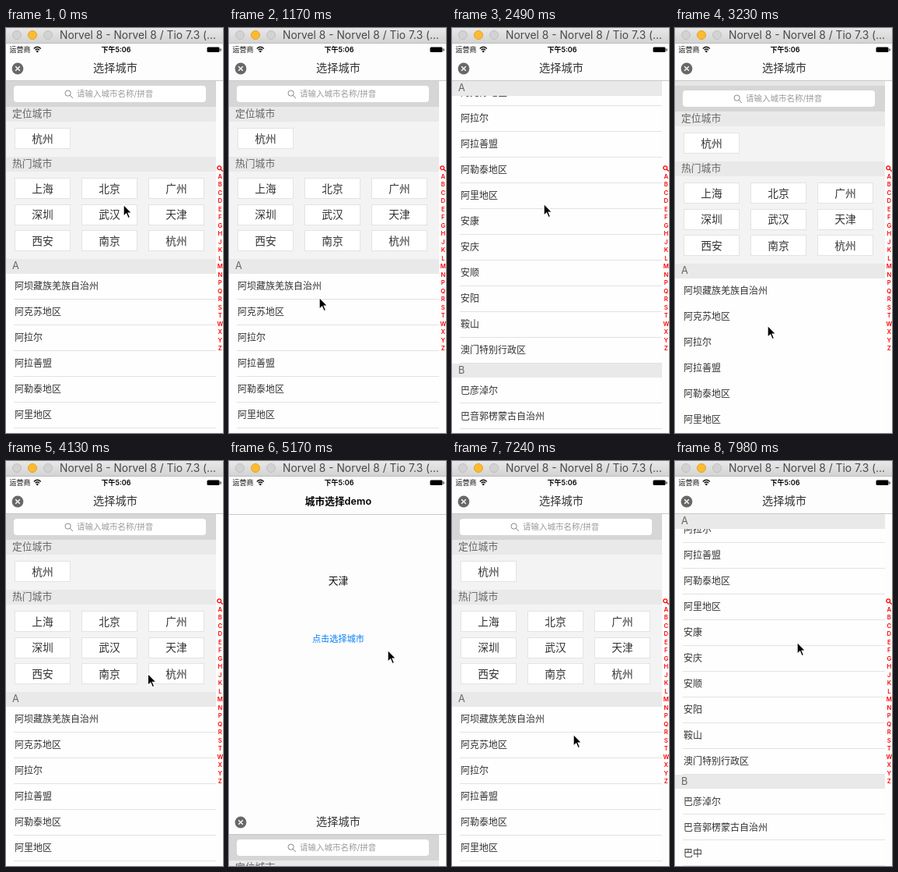
Write an HTML page that moves like this. It is 279x519 px and loops after 8 s.

```html
<!DOCTYPE html>
<html lang="zh-CN">
<head>
<meta charset="utf-8">
<title>选择城市</title>
<style>
html, body { margin: 0; width: 100%; height: 100%; overflow: hidden; background: #fdfdfd; }
body { position: relative; font-family: Inter, "Noto Sans CJK SC", "Noto Sans CJK", sans-serif; }
div, svg { position: absolute; box-sizing: border-box; }
.t { line-height: 20px; height: 20px; white-space: pre; }
#stage { left: 0; top: 0; width: 279px; height: 519px; overflow: hidden; background: #fdfdfd; }
#modal { left: 0; top: 20px; width: 279px; height: 499px; background: #fdfdfd; }
#view { left: 0; top: 48px; width: 270px; height: 451px; overflow: hidden; background: #e6e6e6; }
#list { left: 0; top: 0; width: 270px; height: 900px; background: #fefefe; }
.head { left: 0; width: 270px; height: 18.5px; background: #e9e9e9; }
.cell { left: 0; width: 270px; background: #f3f3f3; }
.city { width: 72px; height: 27px; background: #fff; border: 1px solid #e3e3e3; }
.line { left: 10px; width: 260px; height: 1px; background: #e2e2e2; }
.rule { left: 0; width: 279px; height: 1px; background: #c8c8c8; }
#bar { left: 0; top: 0; width: 279px; height: 20px; background: linear-gradient(#e8e8e8, #d3d3d3); border-bottom: 1px solid #bdbdbd; }
.dot { top: 2.5px; width: 12px; height: 12px; border-radius: 50%; background: #d2d2d2; border: 1px solid #c0c0c0; }
</style>
</head>
<body>
<div id="stage">
  <div id="home"><div class="rule" style="top:68px"></div></div>
  <div id="modal">
    <div id="view"><div id="list">
      <div style="left:0;top:0;width:270px;height:33px;background:#d6d6d6"></div>
      <div style="left:9.5px;top:6px;width:247px;height:21px;border-radius:4px;background:#fff"></div>
      <svg style="left:75px;top:11px" width="12" height="12" fill="none" stroke="#888"><circle cx="4.6" cy="4.6" r="3.6"/><path d="M7.3 7.3L11 11"/></svg>
    </div></div>
    <div class="rule" style="top:47px"></div>
    <svg style="left:7px;top:24px" width="16" height="16"><circle cx="8" cy="8" r="7.4" fill="#686868"/><path d="M5.2 5.2L10.8 10.8M10.8 5.2L5.2 10.8" stroke="#fff" stroke-width="1.4"/></svg>
    <svg style="left:271px;top:156px" width="8" height="8" fill="none" stroke="#f00" stroke-width="1.3"><circle cx="3.2" cy="3.2" r="2.4"/><path d="M5 5L7.6 7.6"/></svg>
  </div>
  <div id="status">
    <svg style="left:35px;top:23px" width="11" height="9" fill="none" stroke="#111" stroke-width="1.4"><path d="M.8 3.4Q5.3 -.8 9.8 3.4M2.6 5.2Q5.3 2.9 8 5.2"/><circle cx="5.3" cy="7" r=".6"/></svg>
    <svg style="left:258px;top:24px" width="20" height="8"><rect x=".5" y=".5" width="16" height="6.5" rx="1.5" fill="#000"/><path d="M18 2.5v3" stroke="#222" stroke-width="1.2"/></svg>
  </div>
  <div id="bar">
    <div class="dot" style="left:8px"></div>
    <div class="dot" style="left:28px;background:#fcbb30;border-color:#e3a32a"></div>
    <div class="dot" style="left:48px"></div>
  </div>
  <svg id="cursor" style="left:-1px;top:-1px" width="15" height="22"><path d="M1 1V16.5L4.6 13.2L7 18.8L9.7 17.6L7.3 12.2H12Z" fill="#000" stroke="#fff" stroke-width="1.4"/></svg>
</div>
<script>
const $ = id => document.getElementById(id);

function box(parent, cls, css) {
  const el = document.createElement('div');
  el.className = cls;
  for (const key in css) el.style[key] = typeof css[key] === 'number' ? css[key] + 'px' : css[key];
  return parent.appendChild(el);
}

function text(parent, str, x, midY, size, color, center, weight = '400') {
  const css = { left: x, top: midY - 10, fontSize: size, color, fontWeight: weight };
  if (center) Object.assign(css, { left: x - 100, width: 200, textAlign: 'center' });
  const el = box(parent, 't', css);
  el.textContent = str;
  return el;
}

// Fixed labels
text($('bar'), 'Norvel 8 - Norvel 8 / Tio 7.3 (…', 69, 9, 13.8, '#4a4a4a');
text($('status'), '运营商', 4.5, 28, 9, '#111');
text($('status'), '下午5:06', 141.5, 28, 9, '#000', true, '600');
text($('home'), '城市选择demo', 140.5, 52, 12.7, '#000', true, '600');
text($('home'), '天津', 140.5, 154, 12.8, '#111', true);
const button = text($('home'), '点击选择城市', 140.5, 228, 11.2, '#0a80fa', true);
text($('modal'), '选择城市', 140.5, 31, 14.2, '#333', true);
[...'ABCDEFGHJKLMNPQRSTWXYZ'].forEach((c, i) =>
  text($('modal'), c, 275.3, 170.5 + 10.5 * i, 7.6, '#f00', true, '600'));

// City list
const list = $('list'), HEAD = 18.5, ROW = 33;
const heads = [], lines = [];
text(list, '请输入城市名称/拼音', 91, 16.5, 10.5, '#999');

function tiles(top, height, names) {
  const cell = box(list, 'cell', { top, height });
  names.forEach((name, i) => {
    const tile = box(cell, 'city', { left: 11 + i % 3 * 86, top: 9 + Math.floor(i / 3) * 33.6 });
    text(tile, name, 35, 12.5, 13.8, '#333', true);
  });
}

function rows(top, names) {
  names.forEach((name, i) => {
    const y = top + i * ROW;
    text(list, name, 11, y + 16.5, 12, '#333');
    lines.push(box(list, 'line', { top: Math.round(y + ROW - 1) }));
  });
}

tiles(51, 46, ['杭州']);
tiles(115, 113, ['上海', '北京', '广州', '深圳', '武汉', '天津', '西安', '南京', '杭州']);
rows(246.5, ['阿坝藏族羌族自治州', '阿克苏地区', '阿拉尔', '阿拉善盟', '阿勒泰地区', '阿里地区',
  '安康', '安庆', '安顺', '安阳', '鞍山', '澳门特别行政区']);
rows(661, ['巴彦淖尔', '巴音郭楞蒙古自治州', '巴中', '白城']);
[['定位城市', 33], ['热门城市', 97], ['A', 228], ['B', 642.5]].forEach(([name, top]) => {
  const el = box(list, 'head', { top });
  text(el, name, 8, 9.2, 12.8, '#666');
  heads.push({ el, top });
});

const LOOP = 8000, TICK = 147.7, LEAD = 25, TRAVEL = 499;
const move = (begin, end, ...goal) => ({ begin, end, goal });

const pointerMoves = [
  move(0, 8, 116, 345),      // down to the list
  move(8, 14.2, 118, 225),   // drag up
  move(17, 22, 119, 381),    // drag down
  move(22, 30, 194, 252),    // to a city tile
  move(31, 33, 204, 242),
  move(39, 44, 153, 227),    // to the button
  move(44, 48, 156, 350),
  move(49, 54, 157, 232),    // drag up again
];
const scrollMoves = [move(9.95, 16, 281), move(17, 22, -6), move(22, 24, 0), move(49, 53, 309)];

function ease(begin, end, tick) {
  const u = Math.min(1, Math.max(0, (tick - begin) / (end - begin)));
  return u * u * (3 - 2 * u);
}

const follow = (moves, first, tick, axis = 0) =>
  moves.reduce((v, m) => v + (m.goal[axis] - v) * ease(m.begin, m.end, tick), first);

const scrollAt = tick => Math.round(follow(scrollMoves, 0, tick));

// Sheet drops away, later springs back up
const sheetAt = tick => tick < 44.5
  ? TRAVEL * ease(34, 35.365, tick)
  : TRAVEL * Math.exp(-1.536 * (tick - 44.5));

const shift = (el, x, y) => { el.style.transform = `translate(${x}px, ${y}px)`; };

function draw(tick) {
  const s = scrollAt(tick);
  const moving = Math.abs(s - scrollAt(tick - 1)) > 12;
  shift(list, 0, -s);
  heads.forEach(({ el, top }, i) => {
    const next = heads[i + 1];
    const limit = next ? next.top - HEAD : Infinity;
    shift(el, 0, Math.max(top, Math.min(s, limit)) - top);
  });
  // Hairlines vanish while the list moves fast
  lines.forEach(el => { el.style.opacity = moving ? 0 : 1; });
  shift($('modal'), 0, Math.round(sheetAt(tick)));
  shift($('cursor'), follow(pointerMoves, 151, tick), follow(pointerMoves, 226, tick, 1));
  button.style.opacity = tick >= 44 && tick < 48 ? 0.5 : 1;
}

const start = performance.now();
let shown = -1;
function play() {
  const time = Math.max(0, performance.now() - start) % LOOP;
  const tick = Math.floor((time + LEAD) / TICK);
  if (tick !== shown) draw(shown = tick);
  requestAnimationFrame(play);
}
play();
</script>
</body>
</html>
```
